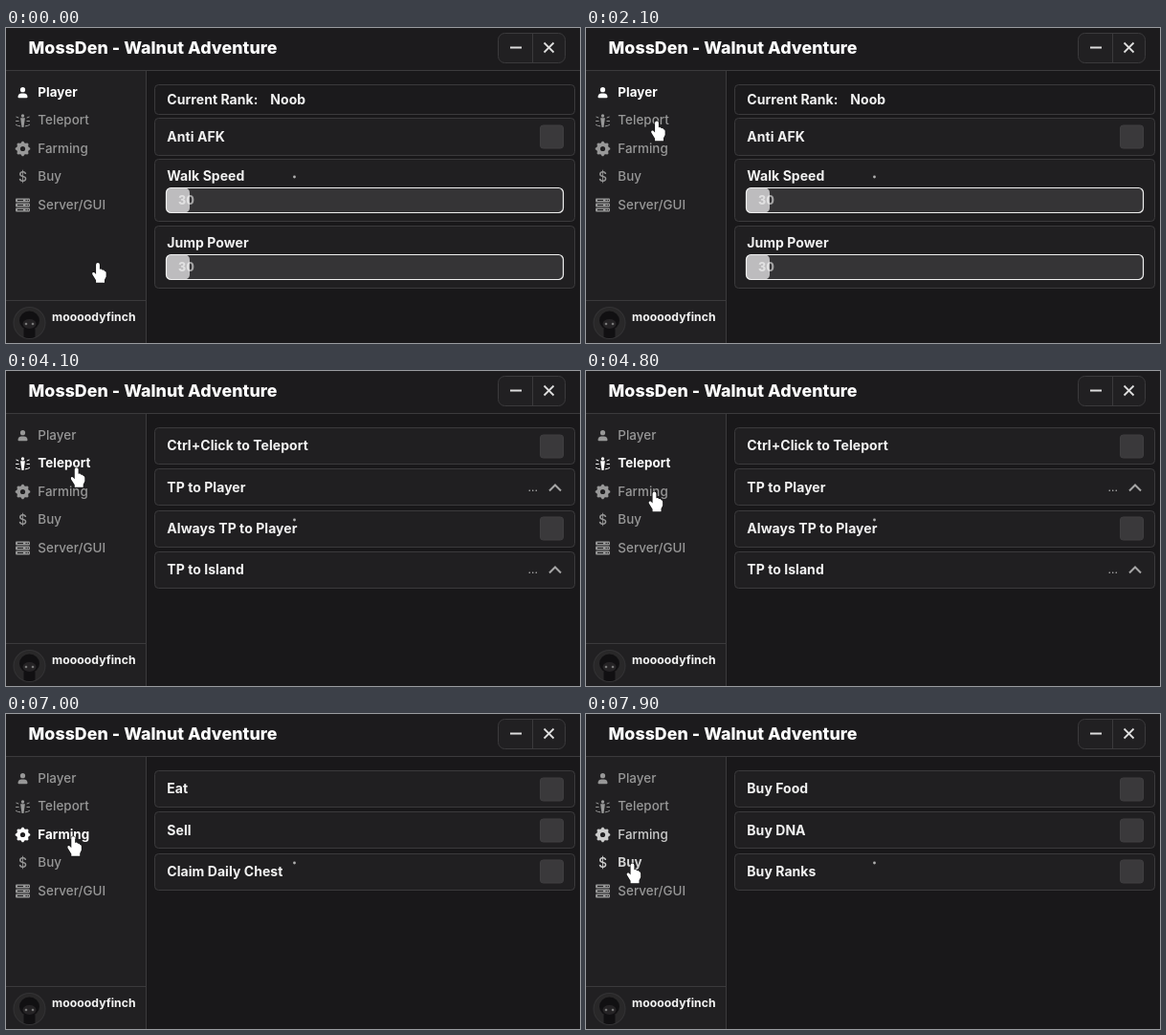
Animation of 600 by 330 pixels, one loop 8 s. Source, as an HTML page with a canvas:

```html
<!DOCTYPE html>
<html lang="en">
<head>
<meta charset="utf-8">
<title>Hub window</title>
<style>
  html, body { margin: 0; width: 100%; height: 100%; overflow: hidden; background: #19181a; }
  canvas { display: block; width: 600px; height: 330px; }
</style>
</head>
<body>
<canvas id="stage"></canvas>
<script>
const canvas = document.getElementById('stage');
const ctx = canvas.getContext('2d');
const ratio = window.devicePixelRatio || 1;
canvas.width = 600 * ratio;
canvas.height = 330 * ratio;

const LOOP = 8000, STEP = 100;
const FONT = 'Inter, "Open Sans", sans-serif';
const LINE = '#3b3a3c', PANEL = '#201f21';

const tabs = [
  { name: 'Player', y: 67, icon: personIcon },
  { name: 'Teleport', y: 96.5, icon: teleportIcon },
  { name: 'Farming', y: 126, icon: gearIcon },
  { name: 'Buy', y: 155.5, icon: dollarIcon },
  { name: 'Server/GUI', y: 185, icon: serverIcon }
];
const pages = [
  drawPlayerPage,
  () => drawRows(['Ctrl+Click to Teleport', 'TP to Player', 'Always TP to Player', 'TP to Island'], [1, 3]),
  () => drawRows(['Eat', 'Sell', 'Claim Daily Chest']),
  () => drawRows(['Buy Food', 'Buy DNA', 'Buy Ranks'])
];
const switches = [2400, 5200, 7900];

const linear = u => u;
const smooth = u => u * u * (3 - 2 * u);
const moves = [
  { start: 0, end: 300, to: [95.5, 246], ease: linear },
  { start: 400, end: 700, to: [95, 248], ease: linear },
  { start: 1700, end: 2100, to: [74, 97.5], ease: smooth },
  { start: 4000, end: 4800, to: [71.5, 126.5], ease: linear },
  { start: 6900, end: 7600, to: [48.5, 156.5], ease: smooth }
];

function pointerAt(t) {
  let [x, y] = [96, 246];
  for (const m of moves) {
    if (t <= m.start) break;
    const u = m.ease(Math.min(1, (t - m.start) / (m.end - m.start)));
    x += (m.to[0] - x) * u;
    y += (m.to[1] - y) * u;
  }
  return [x, y];
}

function gray(level) {
  return `rgb(${level},${level},${level})`;
}

function text(str, x, baseline, size, weight, color) {
  ctx.font = `${weight} ${size}px ${FONT}`;
  ctx.fillStyle = color;
  ctx.fillText(str, x, baseline);
}

function box(x, y, w, h, r, fill, stroke) {
  ctx.beginPath();
  ctx.roundRect(x + 0.5, y + 0.5, w, h, r);
  ctx.fillStyle = fill;
  ctx.fill();
  if (!stroke) return;
  ctx.strokeStyle = stroke;
  ctx.lineWidth = 1;
  ctx.stroke();
}

function line(color, width, ...points) {
  ctx.beginPath();
  points.forEach(([x, y]) => ctx.lineTo(x, y));
  ctx.strokeStyle = color;
  ctx.lineWidth = width;
  ctx.stroke();
}

function disc(x, y, r, color) {
  ctx.beginPath();
  ctx.arc(x, y, r, 0, Math.PI * 2);
  ctx.fillStyle = color;
  ctx.fill();
}

// Icons are drawn around their own centre.
function personIcon(color) {
  disc(0, -2.8, 2.6, color);
  ctx.beginPath();
  ctx.roundRect(-5, 1, 10, 4.8, [4, 4, 1, 1]);
  ctx.fill();
}

function teleportIcon(color) {
  disc(0, -5, 1.7, color);
  ctx.beginPath();
  ctx.moveTo(-2.4, -2.8);
  ctx.lineTo(2.4, -2.8);
  ctx.lineTo(1, 7);
  ctx.lineTo(-1, 7);
  ctx.fill();
  for (const side of [-1, 1]) {
    line(color, 1, [side * 7, -4], [side * 4.2, -3]);
    line(color, 1, [side * 7.4, 0.5], [side * 4, 0.5]);
    line(color, 1, [side * 7.4, 4.2], [side * 5, 5.4], [side * 2.4, 5.9]);
  }
}

function gearIcon(color) {
  ctx.beginPath();
  for (let i = 0; i < 32; i++) {
    const r = i % 4 < 2 ? 7.8 : 6.4;
    const a = (i - 0.5) * Math.PI / 16;
    ctx.lineTo(r * Math.cos(a), r * Math.sin(a));
  }
  ctx.closePath();
  ctx.moveTo(2.6, 0);
  ctx.arc(0, 0, 2.6, 0, Math.PI * 2);
  ctx.fillStyle = color;
  ctx.fill('evenodd');
}

function dollarIcon(color) {
  ctx.textAlign = 'center';
  text('$', 0, 5, 14, 500, color);
  ctx.textAlign = 'left';
}

function serverIcon(color) {
  for (const y of [-7, -2, 3]) {
    ctx.beginPath();
    ctx.roundRect(-7.5, y, 15, 4, 1);
    ctx.fillStyle = color;
    ctx.fill();
    ctx.fillStyle = '#212022';
    ctx.fillRect(-5.5, y + 1.4, 6, 1.2);
    ctx.fillRect(3, y + 1.4, 1.3, 1.2);
    ctx.fillRect(5.2, y + 1.4, 1.3, 1.2);
  }
}

function drawFrame() {
  ctx.fillStyle = '#19181a';
  ctx.fillRect(0, 0, 600, 330);
  ctx.fillStyle = '#1c1b1d';
  ctx.fillRect(0, 0, 600, 44);
  ctx.fillStyle = '#212022';
  ctx.fillRect(0, 45, 146, 285);
  line(LINE, 1, [0, 44.5], [600, 44.5]);
  line(LINE, 1, [146.5, 45], [146.5, 330]);
  line(LINE, 1, [0, 285.5], [146, 285.5]);

  text('MossDen - Walnut Adventure', 23.5, 27, 17.8, 800, '#fff');
  box(514, 5, 70, 31, 7, '#212022', '#3b3a3c');
  line('#3b3a3c', 1, [550.5, 6], [550.5, 36]);
  line('#dedede', 2, [527, 20.5], [539, 20.5]);
  line('#dedede', 1.8, [562.5, 15.5], [572.5, 25.5]);
  line('#dedede', 1.8, [572.5, 15.5], [562.5, 25.5]);
}

function drawAvatar() {
  disc(24.5, 309, 17, '#343335');
  disc(24.5, 309, 16, '#292829');
  ctx.save();
  ctx.beginPath();
  ctx.arc(24.5, 309, 16, 0, Math.PI * 2);
  ctx.clip();
  ctx.fillStyle = '#111012';
  ctx.beginPath();
  ctx.ellipse(24.5, 306.5, 10.5, 10, 0, 0, Math.PI * 2);
  ctx.roundRect(18.5, 313, 12, 13, 3);
  ctx.fill();
  ctx.fillStyle = '#252325';
  ctx.beginPath();
  ctx.ellipse(24.5, 310, 7, 5, 0, 0, Math.PI * 2);
  ctx.fill();
  disc(21, 310, 1.3, '#777');
  disc(28, 310, 1.3, '#777');
  ctx.restore();
  text('moooodyfinch', 48, 306.5, 12.2, 700, '#f4f4f4');
}

function drawTabs(active, previous, fading) {
  tabs.forEach((tab, i) => {
    let level = i === active ? 255 : 152;
    if (fading && i === active) level = 208;
    if (fading && i === previous) level = 204;
    const color = gray(level);
    ctx.save();
    ctx.translate(17.5, tab.y + 0.5);
    tab.icon(color);
    ctx.restore();
    text(tab.name, 33.3, tab.y + 4.7, 13.4, i === active ? 700 : 500, color);
  });
}

function label(str, y, x = 168.3) {
  text(str, x, y + 4.8, 14, 700, '#f2f2f2');
}

function panel(y, h, fill = PANEL) {
  box(155, y, 439, h, 4, fill, LINE);
}

function checkbox(y) {
  box(558, y - 12.5, 24, 24, 3, '#3a393b', '#403f41');
}

function dropdown(y) {
  text('...', 545.5, y + 4, 12, 400, '#b4b4b4');
  line('#a6a6a6', 2, [568, y + 3.5], [574, y - 2.5], [580, y + 3.5]);
}

function slider(y) {
  box(167, y, 415, 26, 5, '#353436');
  ctx.beginPath();
  ctx.roundRect(167.5, y + 0.5, 24.5, 26, 5);
  ctx.fillStyle = '#bdbcbe';
  ctx.fill();
  text('30', 180, y + 17.5, 12.5, 800, 'rgba(255,255,255,.55)');
  ctx.beginPath();
  ctx.roundRect(167.5, y + 0.5, 415, 26, 5);
  ctx.strokeStyle = '#f0f0f0';
  ctx.lineWidth = 1.2;
  ctx.stroke();
}

function drawPlayerPage() {
  panel(59, 31, '#1b1a1c');
  label('Current Rank:', 75);
  label('Noob', 75, 276.3);
  panel(94, 39);
  label('Anti AFK', 114);
  checkbox(114);
  panel(137, 65);
  label('Walk Speed', 155);
  slider(167);
  panel(207, 65);
  label('Jump Power', 225);
  slider(237);
}

function drawRows(names, dropdowns = []) {
  names.forEach((name, i) => {
    const y = 78.5 + i * 43.3;
    panel(Math.round(y - 19.5), 38);
    label(name, y);
    (dropdowns.includes(i) ? dropdown : checkbox)(Math.round(y));
  });
}

function drawPointer(x, y) {
  ctx.save();
  ctx.translate(x, y);
  ctx.scale(0.96, 0.96);
  const hand = new Path2D(
    'M-2 2a2 2 0 0 1 4 0V7Q4 6 5 8Q7 7.4 7.3 9.2Q9 9 9 11V15L7.3 18.5V21.5H-2V19' +
    'L-6 12.5Q-6.6 9.6-4 10.5L-2 12.5Z');
  ctx.strokeStyle = 'rgba(20,20,20,.7)';
  ctx.lineWidth = 1.5;
  ctx.stroke(hand);
  ctx.fillStyle = '#fff';
  ctx.fill(hand);
  ctx.restore();
}

function render(t) {
  const active = switches.filter(s => t >= s).length;
  const fading = active > 0 && t < switches[active - 1] + STEP;
  ctx.setTransform(ratio, 0, 0, ratio, 0, 0);
  ctx.letterSpacing = '0.05px';
  drawFrame();
  drawTabs(active, active - 1, fading);
  drawAvatar();
  pages[active]();
  disc(301.5, 156, 1.4, '#b0b0b0');
  drawPointer(...pointerAt(t));
}

const began = performance.now();
function tick() {
  const t = (performance.now() - began) % LOOP;
  render(Math.floor(t / STEP) * STEP);
  requestAnimationFrame(tick);
}
tick();
</script>
</body>
</html>
```
